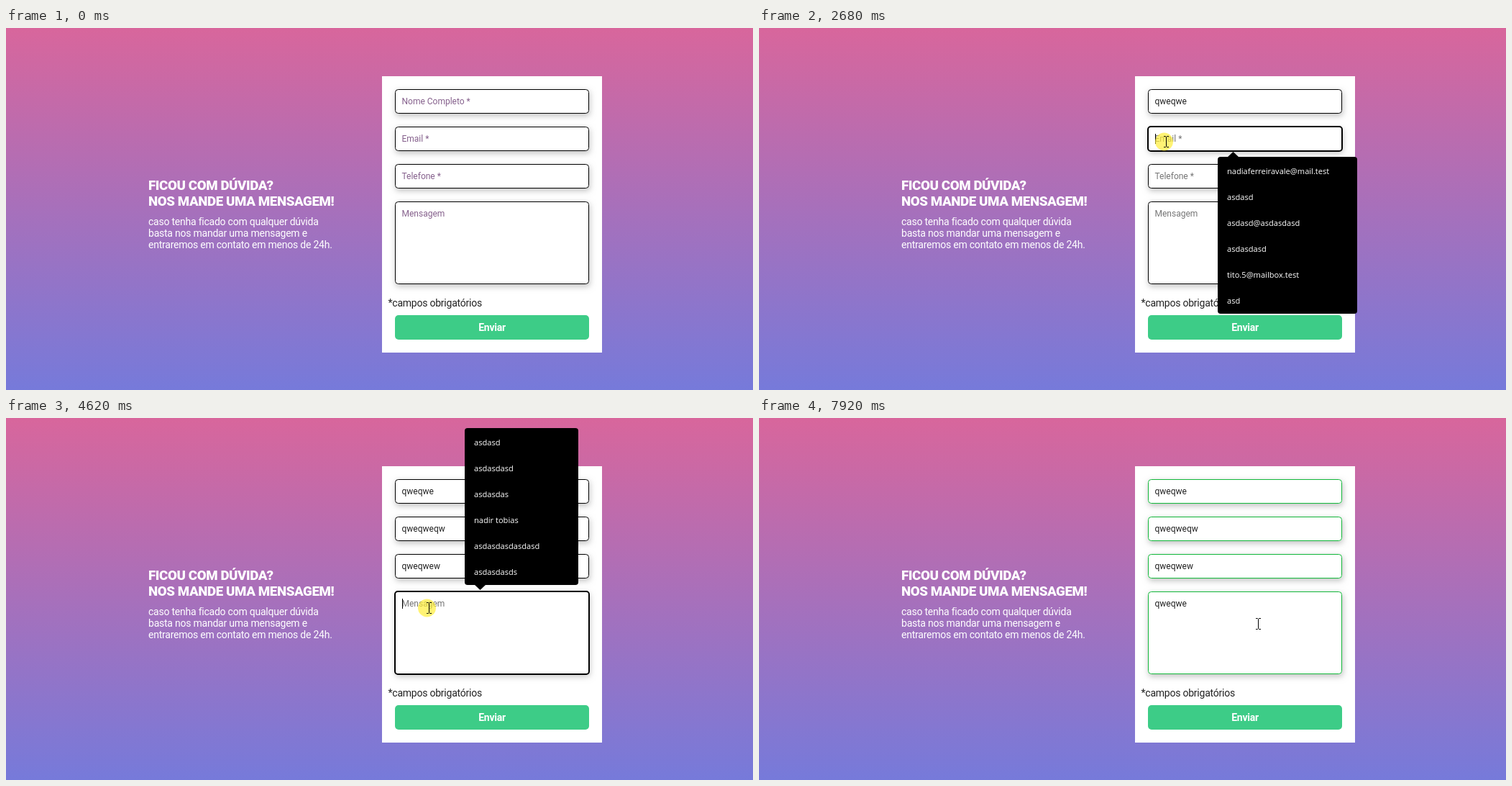
Animation of 1039 by 503 pixels, one loop 7.99 s. Source, as an HTML page with a canvas:

```html
<!DOCTYPE html>
<html lang="pt-BR">
<head>
<meta charset="utf-8">
<title>Formulário de contato</title>
<style>
  html, body { margin: 0; width: 100%; height: 100%; overflow: hidden; }
  canvas { display: block; }
</style>
</head>
<body>
<canvas id="stage" width="1039" height="503"></canvas>
<script>
const ctx = document.getElementById('stage').getContext('2d');
const LOOP = 7990, TICK = LOOP / 120;
const SUBMIT = 6040, VALID = 6100;
const KEY_PACE = 70, CLICK = 120, MOVE = 240;

const styles = {
  title: { font: '900 18.72px Roboto, sans-serif', spacing: '-.4px' },
  body: { font: '14px Roboto, sans-serif', spacing: '-.23px' },
  button: { font: 'bold 14px Roboto, sans-serif', spacing: '-.23px' },
  input: { font: '12px Roboto, sans-serif', spacing: '0px' },
  option: { font: '500 11.1px "Open Sans", sans-serif', spacing: '0px' }
};

const fields = [
  { hint: 'Nome Completo *', text: 'qweqwe', focus: 1930, type: 2130,
    options: 'asdasd asdasdasd asdasdas asdas asdasdasdasdasd asdasdasds'.split(' ') },
  { hint: 'Email *', text: 'qweqweqw', focus: 2680, type: 2945,
    options: 'nadiaferreiravale@mail.test asdasd asdasd@asdasdasd asdasdasd tito.5@mailbox.test asd'.split(' ') },
  { hint: 'Telefone *', text: 'qweqwew', focus: 3660, type: 3865,
    options: 'asdasd asdasdasd asdas 4545454545 asddasd 4445554'.split(' ') },
  { hint: 'Mensagem', text: 'qweqwe', focus: 4620, type: 5010,
    options: ['asdasd', 'asdasdasd', 'asdasdas', 'nadir tobias', 'asdasdasdasdasd', 'asdasdasds'] }
];
fields.forEach((f, i) => {
  const last = i === fields.length - 1;
  f.y = 85 + 52 * i;
  f.h = last ? 115 : 34;
  f.above = last;
  f.blur = last ? SUBMIT : fields[i + 1].focus;
});

// where the pointer comes to rest, and when
const stops = [
  { at: 330, x: 923, y: 473 }, { at: 540, x: 724, y: 418 }, { at: 1080, x: 455, y: 137 },
  { at: 1400, x: 617, y: 99 }, { at: 2540, x: 566, y: 158 }, { at: 3640, x: 582, y: 201 },
  { at: 4350, x: 588, y: 264 }, { at: 5840, x: 658, y: 414 }, { at: 7240, x: 661, y: 363 },
  { at: 7920, x: 694, y: 286 }
];
const clicks = [...fields.map(f => f.focus), SUBMIT];

const within = (v, from, to) => v >= from && v < to;
const clamp = (v, lo, hi) => Math.max(lo, Math.min(hi, v));

function text(str, x, y, style, color, align = 'left') {
  ctx.font = style.font;
  ctx.letterSpacing = style.spacing;
  ctx.fillStyle = color;
  ctx.textAlign = align;
  ctx.fillText(str, x, y);
}

function box(x, y, w, h, r, fill) {
  ctx.beginPath();
  ctx.roundRect(x, y, w, h, r);
  ctx.fillStyle = fill;
  ctx.fill();
}

function drawPage() {
  const sky = ctx.createLinearGradient(0, 0, 0, 503);
  sky.addColorStop(0, '#d8669c');
  sky.addColorStop(1, '#767ada');
  box(0, 0, 1039, 503, 0, sky);
  ['FICOU COM DÚVIDA?', 'NOS MANDE UMA MENSAGEM!'].forEach((line, i) =>
    text(line, 198, 225 + 22 * i, styles.title, '#fff'));
  ['caso tenha ficado com qualquer dúvida', 'basta nos mandar uma mensagem e',
    'entraremos em contato em menos de 24h.'].forEach((line, i) =>
    text(line, 198, 274 + 16 * i, styles.body, '#fff'));
  box(523, 67, 306, 384, 0, '#fff');
  text('*campos obrigatórios', 531.5, 387, styles.body, '#222');
  box(541, 399, 270, 34, 5, '#3dcc87');
  text('Enviar', 676, 421, styles.button, '#fff', 'center');
}

function drawField(f, t) {
  const focused = within(t, f.focus, f.blur);
  const count = clamp(Math.floor((t - f.type) / KEY_PACE) + 1, 0, f.text.length);
  const typed = f.text.slice(0, count);
  const base = f.y + 21;
  ctx.save();
  ctx.shadowColor = 'rgba(0,0,0,.25)';
  ctx.shadowBlur = 8;
  ctx.shadowOffsetX = 1;
  ctx.shadowOffsetY = 3;
  box(541, f.y, 270, f.h, 4, '#fff');
  ctx.restore();
  const inset = focused ? 0 : .5;
  ctx.beginPath();
  ctx.roundRect(541 + inset, f.y + inset, 270 - 2 * inset, f.h - 2 * inset, 4);
  ctx.strokeStyle = t >= VALID ? '#12b83a' : '#000';
  ctx.lineWidth = focused ? 2 : 1;
  ctx.stroke();
  const hintColor = t < fields[0].focus ? '#85608c' : '#757575';
  text(typed || f.hint, 550.5, base, styles.input, typed ? '#222' : hintColor);
  if (!focused) return;
  const lastKey = count ? f.type + (count - 1) * KEY_PACE : f.focus;
  if ((t - lastKey) % 1000 < 500) {
    ctx.fillStyle = '#000';
    ctx.fillRect(Math.round(550.5 + ctx.measureText(typed).width), base - 11, 1, 14);
  }
}

function drawOptions(f) {
  const top = f.above ? f.y - 227 : f.y + 42;
  const wide = f.options.some(o => o.length > 20);
  box(638, top, wide ? 194 : 158, 218, 4, '#000');
  const edge = f.above ? top + 217 : top + 1;
  ctx.beginPath();
  ctx.moveTo(651, edge);
  ctx.lineTo(659.5, edge + (f.above ? 8 : -8));
  ctx.lineTo(668, edge);
  ctx.fill();
  f.options.forEach((option, i) =>
    text(option, 651, top + 24 + 36 * i, styles.option, '#fff'));
}

const shapes = {
  beam: new Path2D('M-3.5-7.5H-1L0-6.5 1-7.5H3.5M0-6.5V6.5M-3.5 7.5H-1L0 6.5 1 7.5H3.5'),
  arrow: new Path2D('M.5.5V16.5L4.2 13 6.6 18.5 9 17.5 6.7 12H11.5Z'),
  hand: new Path2D('M-1.5 12V1.5Q0-.5 1.5 1.5V7Q3.5 5.5 4.5 7.5 6.5 6.5 7.5 8.5 10 7.5 10.5 10V15L8.5 21.5H-.5L-5.5 13.5Q-5 10.5-3 10.5Z')
};

function pointerAt(t) {
  const next = stops.findIndex(s => s.at > t);
  if (next < 0) return stops.at(-1);
  const a = stops[next - 1], b = stops[next];
  const k = clamp(1 - (b.at - t) / Math.min(MOVE, b.at - a.at), 0, 1);
  return { x: a.x + (b.x - a.x) * k, y: a.y + (b.y - a.y) * k };
}

function drawPointer(t) {
  if (t < stops[0].at) return;
  const step = Math.floor((t + 12) / TICK) * TICK;
  const { x, y } = pointerAt(Math.max(step, stops[0].at));
  if (clicks.some(c => within(t, c, c + CLICK))) {
    ctx.beginPath();
    ctx.arc(x - 2.5, y, 12.5, 0, 7);
    ctx.fillStyle = 'rgba(255,238,50,.68)';
    ctx.fill();
  }
  const inside = (top, h) => within(x, 541, 811) && within(y, top, top + h);
  const kind = inside(399, 34) ? 'hand' : fields.some(f => inside(f.y, f.h)) ? 'beam' : 'arrow';
  ctx.save();
  ctx.translate(Math.round(x) + (kind === 'beam' ? .5 : 0), Math.round(y));
  ctx.lineWidth = 1;
  ctx.strokeStyle = '#000';
  ctx.fillStyle = '#fff';
  if (kind !== 'beam') ctx.fill(shapes[kind]);
  ctx.stroke(shapes[kind]);
  ctx.restore();
}

function frame(now) {
  const t = now % LOOP;
  drawPage();
  fields.forEach(f => drawField(f, t));
  fields.filter(f => within(t, f.focus, f.type - 60)).forEach(drawOptions);
  drawPointer(t);
  requestAnimationFrame(frame);
}
requestAnimationFrame(frame);
</script>
</body>
</html>
```
